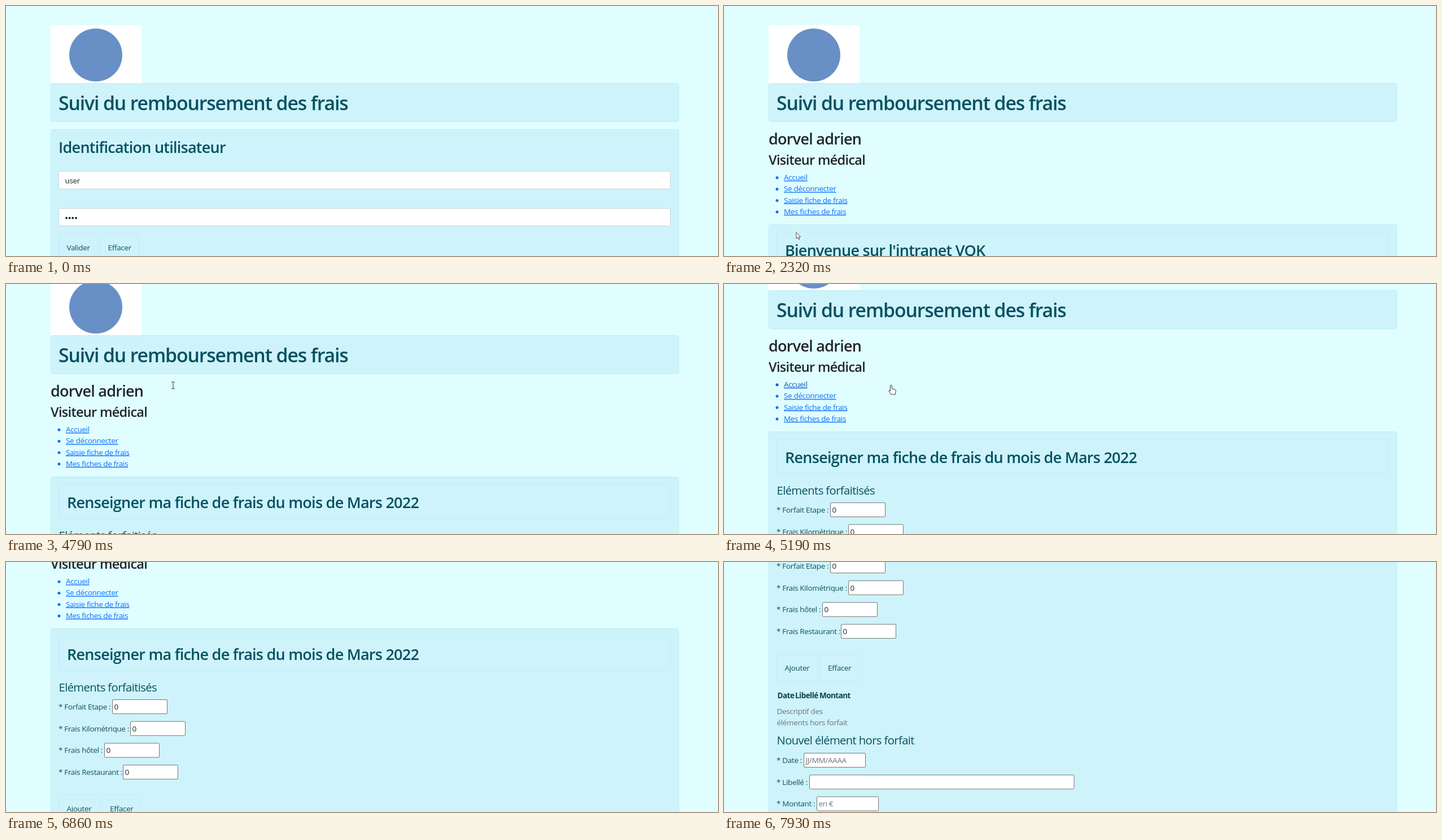
Write an HTML page that moves like this. It is 1261x444 px and loops after 7990 ms.

```html
<!DOCTYPE html>
<html lang="fr">
<head>
<meta charset="utf-8">
<title>Suivi du remboursement des frais</title>
<style>
  html, body { margin: 0; width: 100%; height: 100%; overflow: hidden; background: #e0feff; }
  svg { display: block; width: 1261px; height: 444px; font: 13.5px "Open Sans", "Noto Sans", sans-serif; letter-spacing: -.025em; }
  text { fill: #11505c; }
  .h1, .h2, .h3 { font-weight: 600; fill: #055160; }
  .h1 { font-size: 33.75px; letter-spacing: -.033em; }
  .h2 { font-size: 27px; letter-spacing: -.0275em; }
  .h3 { font-size: 23.6px; letter-spacing: -.031em; }
  .h4 { font-size: 20.25px; letter-spacing: -.031em; fill: #055160; }
  .th { font-weight: 700; letter-spacing: -.04em; fill: #0a414d; }
  .dark, .value { fill: #212529; }
  .muted { fill: #6c757d; }
  .link { fill: #0d6efd; }
  .link.on { fill: #0a58ca; }
  .link text { fill: inherit; text-decoration: underline; }
  .panel { fill: #cef3fb; stroke: #b9eef8; }
  .frame { fill: none; stroke: #bceff9; }
  .field { fill: #fff; stroke: #ced4da; }
  .input { fill: #fff; stroke: #767676; }
</style>
</head>
<body>
<svg id="stage" viewBox="0 0 1261 444"></svg>
<script>
const LOOP = 7990, TICK = 66.7, HOME_AT = 2320, FORM_AT = 3860;
const LIST_TOP = 294.5, ROW = 20.25;

const text = (x, y, s, cls = '') => `<text x="${x}" y="${y}" class="${cls}">${s}</text>`;
const box = (x, y, w, h, cls, r = 3.4) =>
  `<rect x="${x + .5}" y="${y + .5}" width="${w}" height="${h}" rx="${r}" class="${cls}"/>`;
const button = (x, y, w, label) => box(x, y, w, 48, 'frame') + text(x + 14.5, y + 30, label);
const entry = (y, label, x, w, value, cls) =>
  text(93, y + 18, `* ${label} :`) + box(x, y, w, 25, 'input', 1.5) + text(x + 3.5, y + 18, value, cls);

const header =
  '<rect x="79" y="34" width="161" height="103" fill="#fff"/>' +
  '<circle cx="159" cy="87" r="47" fill="#6890c6"/>' +
  box(79, 137, 1112, 68, 'panel') + text(93, 185, 'Suivi du remboursement des frais', 'h1');

const login =
  box(79, 219, 1112, 400, 'panel') + text(93, 260.5, 'Identification utilisateur', 'h2') +
  box(93, 293, 1083, 31.5, 'field', 2.5) + text(104.5, 314.5, 'user', 'value') +
  box(93, 359, 1083, 31, 'field', 2.5) +
  [107, 112.7, 118.3, 124].map(x => `<circle cx="${x}" cy="376.5" r="1.9" fill="#212529"/>`).join('') +
  button(93, 404, 68.5, 'Valider') + button(166, 404, 68.5, 'Effacer');

const links = ['Accueil', 'Se déconnecter', 'Saisie fiche de frais', 'Mes fiches de frais'];
const member =
  text(79, 246, 'dorvel adrien', 'h2 dark') + text(79, 282, 'Visiteur médical', 'h3 dark') +
  links.map((label, i) => `<g class="link"><circle cx="94" cy="${305 + i * ROW}" r="2.5"/>` +
    text(106, 309 + i * ROW, label) + '</g>').join('') +
  box(79, 388, 1112, 800, 'panel') + box(93, 402, 1083, 60.5, 'frame');

const home = text(108, 444, "Bienvenue sur l'intranet VQK", 'h2');

const fees = [['Forfait Etape', 188], ['Frais Kilométrique', 220], ['Frais hôtel', 174], ['Frais Restaurant', 207]];
const extras = [['Date', 141, 109, 'JJ/MM/AAAA'], ['Libellé', 151, 468.5, ''], ['Montant', 164, 109, 'en €']];
const form =
  text(108, 444, 'Renseigner ma fiche de frais du mois de Mars 2022', 'h2') +
  text(93.5, 500, 'Eléments forfaitisés', 'h4') +
  fees.map(([label, x], i) => entry(514 + i * 38.7, label, x, 97, '0', 'value')).join('') +
  button(93, 683, 72, 'Ajouter') + button(169.5, 683, 68.5, 'Effacer') +
  text(94.5, 762, 'Date', 'th') + text(126, 762, 'Libellé', 'th') + text(169, 762, 'Montant', 'th') +
  text(93.5, 790, 'Descriptif des', 'muted') + text(93.5, 810, 'éléments hors forfait', 'muted') +
  text(93.5, 844, 'Nouvel élément hors forfait', 'h4') +
  extras.map(([label, x, w, hint], i) => entry(859 + i * 38.7, label, x, w, hint, 'muted')).join('');

const pointers = {
  arrow: '<path d="M0 0V11L2.6 8.7L4.3 12.6L6 11.9L4.4 8H7.6Z" fill="#fff" stroke="#222" stroke-width=".8"/>',
  beam: '<path d="M-3-6H-.8L0-5.4L.8-6H3M0-5.4V5.4M-3 6H-.8L0 5.4L.8 6H3" fill="none" stroke="#333"/>',
  hand: '<path d="M-1.5 8V1a1.4 1.4 0 0 1 2.8 0V6l5 1q2 .6 2 2.5L7.5 16H0L-4 10q0-2 2.5 0Z" fill="#fff" stroke="#222" stroke-width=".9"/>'
};

const group = (id, body) => `<g id="${id}">${body}</g>`;
const stage = document.getElementById('stage');
stage.innerHTML = group('page', header + group('login', login) +
  group('member', member + group('home', home) + group('form', form))) +
  group('cursor', Object.entries(pointers).map(([id, body]) => group(id, body)).join(''));
const el = id => document.getElementById(id);
const show = (id, on) => el(id).setAttribute('display', on ? 'inline' : 'none');
const linkNodes = [...stage.querySelectorAll('.link')];

// Wheel notches: start time and duration, each moves the page by 66px
const notches = [[4677, 280], [5010, 280], [6211, 280], [6505, 280], [6857, 280], [7080, 280], [7325, 280], [7590, 532]];
const scrollAt = t => Math.round(notches.reduce((sum, [start, length]) => {
  const p = Math.min(1, Math.max(0, (t - start) / length));
  return sum + 66 * (1 - (1 - p) ** 2);
}, 0));

// Pointer stops: time, x, y
const stops = [
  [130, 1000, 368], [870, 332, 429], [930, 332, 429], [1220, 225, 373], [1470, 97, 427], [1630, 115, 413],
  [1930, 115, 413], [2030, 118, 416], [2319, 118, 416], [2320, 128, 402], [2480, 128, 402], [3060, 150, 324],
  [3630, 165, 338], [3860, 165, 338], [4510, 296, 180], [5340, 296, 180], [5540, 430, 206], [5930, 1258, 146]
];
function pointerAt(t) {
  const i = stops.findIndex(s => s[0] > t);
  if (i < 1) return null;
  const [t0, x0, y0] = stops[i - 1], [t1, x1, y1] = stops[i];
  const p = (t - t0) / (t1 - t0), e = p * p * (3 - 2 * p);
  return [x0 + (x1 - x0) * e, y0 + (y1 - y0) * e];
}

function pointerKind(x, y, loggedIn, row) {
  if (loggedIn) return row >= 0 && row < 4 ? 'hand' : y < LIST_TOP ? 'beam' : 'arrow';
  if (y > 359 && y < 390) return 'beam';
  return y > 404 && x < 235 ? 'hand' : 'arrow';
}

function draw(now) {
  const t = Math.floor((now % LOOP + 17) / TICK) * TICK;
  const loggedIn = t >= HOME_AT, onForm = t >= FORM_AT;
  const scroll = scrollAt(t), pos = pointerAt(t);
  show('login', !loggedIn);
  show('member', loggedIn);
  show('home', !onForm);
  show('form', onForm);
  el('page').setAttribute('transform', `translate(0 ${-scroll})`);

  show('cursor', pos);
  let row = -1;
  if (pos) {
    const [x, y] = pos.map(Math.round);
    if (loggedIn && x < 1192) row = Math.floor((y + scroll - LIST_TOP) / ROW);
    const kind = pointerKind(x, y + scroll, loggedIn, row);
    for (const id in pointers) show(id, id === kind);
    el('cursor').setAttribute('transform', `translate(${x} ${y})`);
  }
  linkNodes.forEach((node, i) => node.classList.toggle('on', i === row));
}

let start;
function tick(now) {
  start ??= now;
  draw(now - start);
  requestAnimationFrame(tick);
}
draw(0);
requestAnimationFrame(tick);
</script>
</body>
</html>
```
